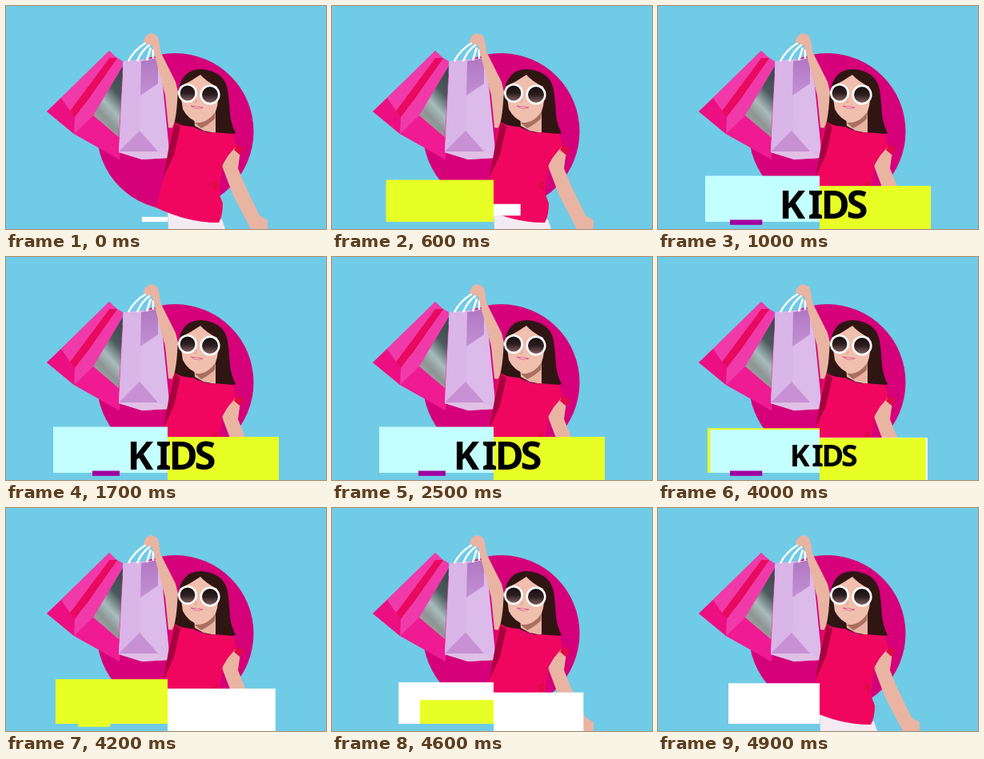
These frames come from a looping animation (400 px wide and 279 px high, 5000 ms). An HTML page:

```html
<!DOCTYPE html>
<html lang="en">
<head>
<meta charset="utf-8">
<title>Kids shopping</title>
<style>
html, body { margin: 0; width: 100%; height: 100%; overflow: hidden; background: #70cbe6; }
svg { display: block; width: 100vw; height: 100vh; }
text { font: bold 49px "Noto Sans", sans-serif; }
</style>
</head>
<body>
<svg viewBox="0 0 400 279">
  <defs>
    <linearGradient id="silver" x1=".9" y1="0" x2=".45" y2="1">
      <stop offset="0" stop-color="#39474a"/><stop offset=".35" stop-color="#4b5b5c"/>
      <stop offset=".6" stop-color="#a9bcbd"/><stop offset=".78" stop-color="#8d9594"/>
      <stop offset="1" stop-color="#a8a3a0"/>
    </linearGradient>
    <linearGradient id="fold" x2="0" y2="1">
      <stop offset="0" stop-color="#b077c2"/><stop offset="1" stop-color="#c391d3"/>
    </linearGradient>
    <linearGradient id="lens" x2="0" y2="1">
      <stop offset="0" stop-color="#150d0f"/><stop offset=".5" stop-color="#2c1d1e"/>
      <stop offset="1" stop-color="#866865"/>
    </linearGradient>
  </defs>
  <rect width="400" height="279" fill="#70cbe6"/>
  <circle cx="211.500" cy="157" r="98" fill="#d5007a"/>

  <!-- pink bag -->
  <path d="M51 132L129 56L139 65L146 69L142 192L85 160Z" fill="#f03aaa"/>
  <path d="M51 132L69 115L86 138L85 160Z" fill="#ec0f82"/>
  <path d="M129 65L139 65L102 118L86 138L84 136Z" fill="#e6004e"/>
  <path d="M69 115L84 121L129 65L139 65L86 139Z" fill="#e80a5e"/>
  <path d="M69 115L129 56L133 60L84 126L80 131Z" fill="#f03aaa"/>
  <path d="M146 75L109 137L141 165Z" fill="url(#silver)"/>
  <path d="M109 137L142 165L142 192L85 160Z" fill="#f01a92"/>

  <!-- lilac bag -->
  <path d="M147 69L190 65L196 100L205 190L170 192L141 183Z" fill="#dcbaea"/>
  <path d="M147 69H169L168 157L141 183Z" fill="#d9b5e8"/>
  <path d="M169 69L190 65V97L168 112Z" fill="url(#fold)"/>
  <path d="M141 182L167 156L190 182Z" fill="#c791d3"/>
  <path d="M141 183L190 182L204 190L170 192Z" fill="#e1c0e6"/>
  <path d="M153 69Q160 55 175 46M164 69Q169 56 180 48M176 68L181 52M184 66V54" fill="none" stroke="#fff" stroke-width="2.600"/>

  <!-- woman -->
  <path d="M172 45Q172 37 181 34Q190 35 191 43L193 57L212 95L218 120L215 154L203 152L199 112L186 62L183 50Z" fill="#eab4a3"/>
  <path d="M210 148Q213 136 214 120Q215 90 230 82Q243 76 258 82Q274 88 277 105Q279 118 280 136Q282 150 287 159Q274 163 258 160L232 151Z" fill="#2f1613"/>
  <path d="M235 138L262 131L262 159L247 156L236 150Z" fill="#eab4a3"/>
  <path d="M236 146Q253 147 262 131L261 141Q254 148 244 153Z" fill="#a9705f"/>
  <path d="M217 101Q230 95 243 86Q251 95 264 101Q267 119 262 132Q253 144 242 146Q228 143 221 129Z" fill="#f0bfae"/>
  <path d="M231 125Q239 126 246 127Q239 130 231 125Z" fill="#fff" stroke="#dd5a80"/>
  <path d="M236 113L238 120L235 121" fill="none" stroke="#d99c8c"/>
  <g fill="url(#lens)" stroke="#fff" stroke-width="2.600">
    <circle cx="227" cy="109" r="10.700"/><circle cx="255" cy="111" r="11.300"/>
  </g>
  <path d="M202 258L270 267L274 279H203Z" fill="#f3eaf2"/>
  <path d="M285 174L293 181L290 203L298 223L317 262L327 268V279H306L284 237L270 200Z" fill="#eab4a3"/>
  <path d="M211 145Q222 152 234 151Q245 160 260 158L284 160L288 175L271 195Q270 208 268 217L266 234L271 247Q271 262 266 271Q230 272 187 252L202 198L205 158Z" fill="#f0065f"/>
  <path d="M211 146L218 151L210 186L197 214L203 180Z" fill="#a9003f"/>
  <path d="M288 174L298 178L292 186L285 180ZM257 222L265 219L264 231L259 228Z" fill="#e00a45"/>

  <!-- panels -->
  <rect id="leftWhite" fill="#fff"/>
  <rect id="leftYellow" fill="#e8ff26"/>
  <rect id="leftCyan" fill="#c4ffff"/>
  <rect id="bar"/>
  <rect id="rightWhite" fill="#fff"/>
  <rect id="rightYellow" fill="#e8ff26"/>
  <text id="word" x="151.500 187.500 203.500 235.500" y="265.800">KIDS</text>
</svg>
<script>
const LOOP = 5000, STEP = 100;
const $ = id => document.getElementById(id);
const clamp = p => Math.min(1, Math.max(0, p));
const cubicOut = p => 1 - (1 - p) ** 3;
const cubicIn = p => p ** 3;
const backOut = p => 1 + 1.9 * (p - 1) ** 3 + .9 * (p - 1) ** 2;
const backIn = p => 1.9 * p ** 3 - .9 * p ** 2;

// Grows over inLen from inAt, shrinks over outLen from outAt.
function grow(t, inAt, inLen, outAt, outLen, bounce) {
  const a = clamp((t - inAt) / inLen), b = clamp((t - outAt) / outLen);
  return Math.max(0, bounce ? backOut(a) - backIn(b) : cubicOut(a) - cubicIn(b));
}

function setBox(id, x, y, width, height) {
  const box = { x, y, width, height };
  for (const key in box) $(id).setAttribute(key, box[key]);
}

// Pinned at the bottom right corner.
function left(id, s, power = 1.5) {
  const w = 143 * s, h = 57.5 * s ** power;
  setBox(id, 202 - w, 270 - h, w, h);
}

// Pinned at the middle of the left side.
function right(id, s) {
  setBox(id, 202, 255 - 30 * s, 139 * s, 60 * s);
}

function draw(t) {
  left("leftWhite", .83 * grow(t, -60, 600, 4690, 615), t < 2500 ? 1.5 : .55);
  left("leftYellow", .98 * grow(t, 200, 610, 4250, 500));
  left("leftCyan", grow(t, 650, 350, 3780, 400, true));
  right("rightWhite", .97 * grow(t, 568, 350, 4300, 545));
  right("rightYellow", grow(t, 700, 300, 3780, 400, true));

  const leaving = t >= 4100;
  const angle = (t - (leaving ? 200 : 0)) * Math.PI / 300;
  const x = 100 + 18 * Math.cos(angle) + 2 * Math.cos(2 * angle);
  const shown = t >= 900 && t < 4500;
  setBox("bar", x, 267.500, shown ? .35 * (205 - x) : 0, 6.300);
  $("bar").setAttribute("fill", leaving ? "#e8ff26" : "#a000a0");

  const s = grow(t, 700, 300, 3750, 350, true);
  $("word").setAttribute("transform", `translate(208 248) scale(${s}) translate(-208 -248)`);
}

const start = performance.now();
function tick() {
  const t = (performance.now() - start) % LOOP;
  draw(Math.floor(t / STEP) * STEP);
  requestAnimationFrame(tick);
}
tick();
</script>
</body>
</html>
```
